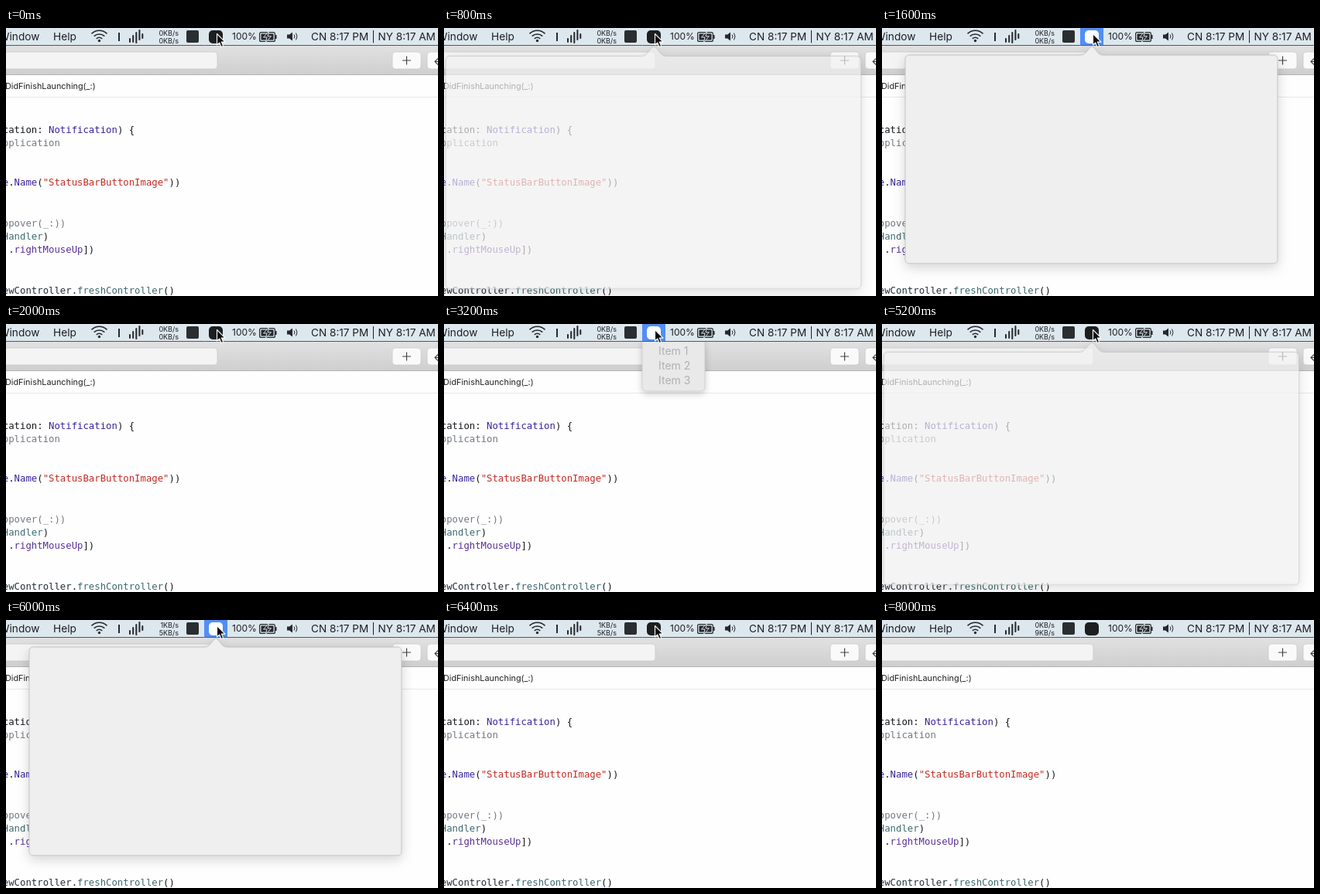
Recreate the animation shown at these times as an HTML page. Size 558 by 347 pixels, loop 8200 ms.

```html
<!DOCTYPE html>
<html lang="en">
<head>
<meta charset="utf-8">
<title>Status bar popover</title>
<style>
html, body { margin: 0; width: 100%; height: 100%; overflow: hidden; background: #fefefe; }
svg { display: block; width: 558px; height: 347px; }
text { font-family: Inter, "Open Sans", sans-serif; fill: #1d1f22; }
.code text { font: 12.3px "DejaVu Sans Mono", "Liberation Mono", monospace; fill: #16181c; }
.code .type { fill: #3a229c; }
.code .string { fill: #c42a24; }
.code .dim { fill: #737883; }
.code .teal { fill: #3b696e; }
.code .navy { fill: #1f3038; }
.code .enum { fill: #5a3096; }
.bar { font-size: 13.7px; }
.rate { font-size: 9px; text-anchor: end; }
.item { font-size: 14px; fill: #b1b1b3; }

/* All steps fall on a 200 ms beat of the 8.2 s loop. */
.popover, .menu, .active, .cursor, .rate1, .rate2, .rate3 {
  animation: 8.2s step-end infinite;
}
.popover { animation-name: popover; transform-origin: 271px 24px; }
@keyframes popover {
  0%      { opacity: 0; transform: scale(.6); }
  7.317%  { opacity: .3; transform: scale(.7); }
  9.756%  { opacity: .7; transform: scale(1.116); }
  12.195% { opacity: 1; transform: none; }
  21.951% { opacity: .4; transform: none; }
  24.39%  { opacity: 0; transform: scale(.6); }
  60.975% { opacity: .3; transform: scale(.7); }
  63.414% { opacity: .7; transform: scale(1.116); }
  65.853% { opacity: 1; transform: none; }
  75.609% { opacity: .4; transform: none; }
  78.048%, 100% { opacity: 0; transform: none; }
}
.menu { animation-name: menu; }
@keyframes menu {
  0%, 51.219%, 100% { opacity: 0; }
  31.707% { opacity: 1; }
  48.78%  { opacity: .45; }
}
.active { animation-name: active; }
@keyframes active {
  0%, 4.878%, 21.951%, 51.219%, 58.536%, 75.609%, 100% { opacity: 0; }
  2.439%, 17.073%, 31.707%, 56.097%, 70.731% { opacity: 1; }
}
.cursor { animation-name: cursor; }
@keyframes cursor {
  0%      { transform: none; opacity: 1; }
  82.926% { transform: translate(-8px, 90px); opacity: 1; }
  85.365% { transform: translate(-20px, 230px); opacity: 1; }
  87.804%, 100% { transform: none; opacity: 0; }
}
.rate1 { animation-name: rate1; }
.rate2 { animation-name: rate2; }
.rate3 { animation-name: rate3; }
@keyframes rate1 { 0% { opacity: 1; } 70.731%, 100% { opacity: 0; } }
@keyframes rate2 { 0%, 95.121%, 100% { opacity: 0; } 70.731% { opacity: 1; } }
@keyframes rate3 { 0% { opacity: 0; } 95.121%, 100% { opacity: 1; } }
</style>
</head>
<body>
<svg viewBox="0 0 558 347">
  <defs>
    <linearGradient id="toolbar" x2="0" y2="1">
      <stop stop-color="#e2e1e2"/><stop offset="1" stop-color="#cfcecf"/>
    </linearGradient>
    <filter id="shadow" x="-10%" y="-10%" width="120%" height="125%">
      <feDropShadow dx="0" dy="5" stdDeviation="7.5" flood-opacity=".17"/>
    </filter>
    <filter id="menuShadow" x="-25%" y="-25%" width="150%" height="160%">
      <feDropShadow dx="0" dy="3" stdDeviation="4" flood-opacity=".2"/>
    </filter>
  </defs>

  <rect width="558" height="347" fill="#fefefe"/>

  <!-- Editor window -->
  <rect y="23" width="558" height="38" fill="url(#toolbar)"/>
  <path d="M0 60.5H558" stroke="#b4b3b4"/>
  <path d="M0 89.5H558" stroke="#e6e6e6"/>
  <g fill="#fafafa" stroke="#c3c2c3" stroke-width=".6">
    <rect x="-10" y="31" width="283" height="22" rx="4" fill="#f4f4f4"/>
    <rect x="499" y="31" width="37" height="22" rx="4"/>
    <rect x="544" y="31" width="37" height="22" rx="4"/>
  </g>
  <path d="M512 42H523M517.5 36.5V47.5M560 43.5H554M558 39.5L554 43.5L558 47.5" fill="none" stroke="#444" stroke-width="1.2"/>
  <text x="-1" y="79" font-size="10.85">DidFinishLaunching(_:)</text>

  <g class="code">
    <text x="-4.2" y="136">cation: <tspan class="type">Notification</tspan>) {</text>
    <text x="-4.2" y="153" class="dim">pplication</text>
    <text x="-4.2" y="204"><tspan class="type">e</tspan>.<tspan class="type">Name</tspan>(<tspan class="string">"StatusBarButtonImage"</tspan>))</text>
    <text x="-4.2" y="257" class="dim">opover(_:))</text>
    <text x="-4.2" y="274"><tspan class="teal">Handler</tspan>)</text>
    <text x="3.2" y="291">.<tspan class="enum">rightMouseUp</tspan>])</text>
    <text x="-4.2" y="344"><tspan class="navy">ewController</tspan>.<tspan class="teal">freshController</tspan>()</text>
  </g>

  <g class="popover">
    <path d="M35 35H257C264 35 267 24 271 24S278 35 285 35H506a5 5 0 0 1 5 5V300a5 5 0 0 1-5 5H35a5 5 0 0 1-5-5V40a5 5 0 0 1 5-5Z"
      fill="#efefef" stroke="#b5b5b5" stroke-width=".8" filter="url(#shadow)"/>
  </g>

  <g class="menu">
    <path d="M256 22H337V82a5 5 0 0 1-5 5H261a5 5 0 0 1-5-5Z" fill="#e9e9ea" stroke="#bdbdbd" stroke-width=".6" filter="url(#menuShadow)"/>
    <text class="item" x="277" y="40">Item 1</text>
    <text class="item" x="277" y="59">Item 2</text>
    <text class="item" x="277" y="78">Item 3</text>
  </g>

  <!-- Menu bar -->
  <rect width="558" height="22" fill="#dde7ee"/>
  <path d="M0 22.5H558" stroke="#54585b"/>
  <g class="bar">
    <text x="43.5" y="16" text-anchor="end">Window</text>
    <text x="61" y="16">Help</text>
    <text x="292" y="15" font-size="12">100%</text>
    <text x="394" y="16" font-size="13.6">CN 8:17 PM | NY 8:17 AM</text>
  </g>
  <g fill="none" stroke="#26292c" stroke-width="1.6">
    <path d="M110.5 7.3A14.5 14.5 0 0 1 130.5 7.3M113.7 10.6A10 10 0 0 1 127.3 10.6M116.8 13.8A5.6 5.6 0 0 1 124.2 13.8"/>
    <path d="M146 6V17" stroke-width="2"/>
    <path d="M160 14V18M164.2 10V18M168.3 6V19M172.4 3V15M176.3 8V13" stroke-width="2" stroke-linecap="round"/>
    <path d="M372 8.5Q374 11 372 13.5M374.5 6.5Q377.5 11 374.5 15.5" stroke-width="1"/>
  </g>
  <circle cx="120.5" cy="16.5" r="1.7" fill="#26292c"/>
  <path d="M363 8.5H366L370 5.5V16.5L366 13.5H363Z" fill="#26292c"/>
  <rect x="327.6" y="5.6" width="19.8" height="11.8" rx="2" fill="none" stroke="#26292c" stroke-width="1.2"/>
  <rect x="329.5" y="7.5" width="16" height="8" rx=".6" fill="#26292c"/>
  <path d="M348.8 9V14" stroke="#26292c" stroke-width="1.5"/>
  <path d="M339.5 4.5L332.5 12H337L335.5 18.5L342.5 10.7H338Z" fill="#26292c" stroke="#dde7ee"/>

  <g class="rate rate1"><text x="223" y="10.3">0KB/s</text><text x="223" y="19.8">0KB/s</text></g>
  <g class="rate rate2"><text x="223" y="10.3">1KB/s</text><text x="223" y="19.8">5KB/s</text></g>
  <g class="rate rate3"><text x="223" y="10.3">0KB/s</text><text x="223" y="19.8">9KB/s</text></g>

  <rect x="233" y="3" width="16" height="16" rx="2" fill="#2b2e30"/>
  <rect x="262" y="3" width="18" height="17" rx="5" fill="#1c1e20"/>
  <g class="active">
    <rect x="256" width="30" height="22" fill="#528ef5"/>
    <rect x="262" y="3" width="18" height="17" rx="5" fill="#fff"/>
  </g>

  <g class="cursor">
    <path d="M272.5 7.5V22L275.8 19L278 24.5L280.6 23.4L278.3 18.1H283Z" fill="#0c0c0c" stroke="#fff" stroke-width="1.1" stroke-linejoin="round"/>
  </g>
</svg>
</body>
</html>
```
